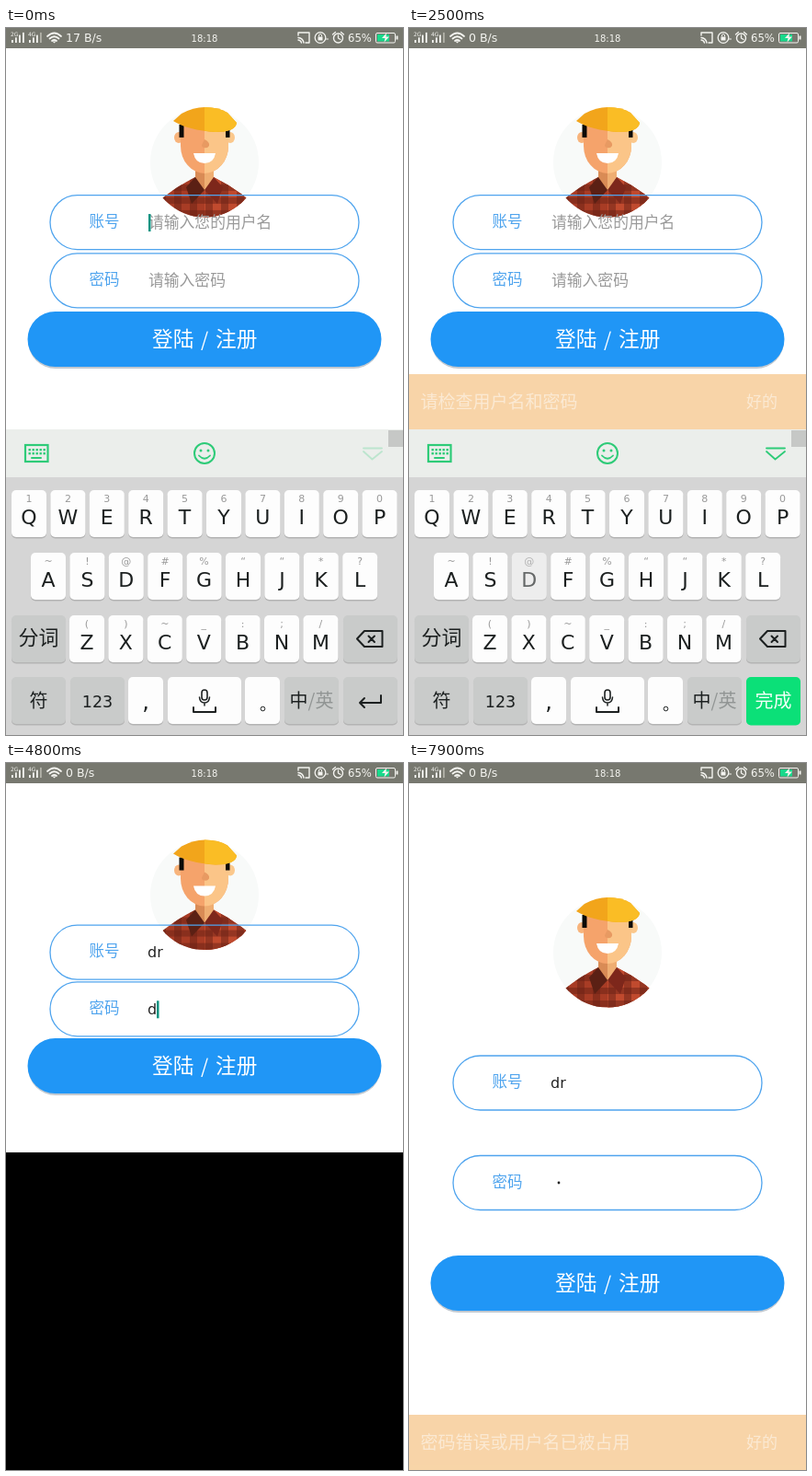
Recreate the animation shown at these times as an HTML page. Size 432 by 768 pixels, loop 8 s.

```html
<!DOCTYPE html>
<html lang="zh">
<head>
<meta charset="utf-8">
<style>
html, body { margin: 0; width: 100%; height: 100%; overflow: hidden; background: #fff; }
svg { display: block; width: 100vw; height: 100vh; }
text { font-family: "Noto Sans CJK SC", "Noto Sans CJK", sans-serif; font-weight: 200; }
.latin { font-family: "DejaVu Sans", sans-serif; font-weight: 400; }
.mid { text-anchor: middle; }
</style>
</head>
<body>
<svg id="stage" viewBox="0 0 432 768" xmlns="http://www.w3.org/2000/svg"></svg>
<script>
const LOOP = 8000, STEP = 100, FULL = 768, KEYS_TOP = 436, SECURE_TOP = 423;
const stage = document.getElementById('stage');
const $ = id => document.getElementById(id);

const rect = (x, y, w, h, fill, extra = '') =>
  `<rect x="${x}" y="${y}" width="${w}" height="${h}" fill="${fill}" ${extra}/>`;
const path = (d, fill, extra = '') => `<path d="${d}" fill="${fill}" ${extra}/>`;
const line = (d, color, width = 1.5) =>
  path(d, 'none', `stroke="${color}" stroke-width="${width}" stroke-linecap="round" stroke-linejoin="round"`);
const label = (s, x, y, size, fill, extra = '') =>
  `<text x="${x}" y="${y}" font-size="${size}" fill="${fill}" ${extra}>${s}</text>`;
const LATIN = 'class="latin"', MID = 'class="mid"', LATIN_MID = 'class="latin mid"';

function statusBar() {
  const white = '#f4f4f0';
  const signal = (x, tag, last) => label(tag, x, 9, 6, white, LATIN) +
    [0, 1, 2, 3].map(i => rect(x + 1 + i * 4, 13 - i * 2.7, 1.8, 3 + i * 2.7,
      i === 3 ? last : white)).join('');
  return rect(0, 0, 432, 22, '#77786f') +
    signal(5, '2G', white) + signal(24, '4G', '#b2b2a8') +
    line('M45 9Q52.500 2 60 9M47.500 11.500Q52.500 7 57.500 11.500M50 14Q52.500 12 55 14', white, 1.8) +
    path('M50.500 14.500h4l-2 2z', white) +
    label('', 65, 14.5, 12.5, white, LATIN + ' id="speed"') +
    label('18:18', 216, 14.5, 10, white, LATIN_MID) +
    line('M318 8V5H330V16H326M318 10.500Q323 11 324 16M318 13Q321 13.500 321.500 16', white, 1.4) +
    `<circle cx="342" cy="10.500" r="5.800" fill="none" stroke="${white}" stroke-width="1.300"/>` +
    rect(339.5, 9.5, 5, 4, white) + line('M340.500 9V7.500Q342 5.500 343.500 7.500V9M347.500 12h3', white, 1) +
    `<circle cx="361.500" cy="11" r="5" fill="none" stroke="${white}" stroke-width="1.400"/>` +
    line('M361.500 8V11L364 12.500M355.500 7L358.500 4.500M364.500 4.500L367.500 7', white, 1.3) +
    label('65%', 372, 14.5, 11.7, white, LATIN) +
    rect(402.5, 5.5, 21, 10.5, 'none', `rx="1.500" stroke="${white}"`) +
    rect(404, 7, 13, 7.5, '#18d98b') + rect(424.5, 8.5, 2, 4, white) +
    path('M414 5.500L409 11H412.500L411.500 15.500L417 9.500H413.500Z', white);
}

// Drawn around its own centre.
function avatar() {
  let plaid = '';
  for (let i = 0; i < 6; i++) plaid += rect(-50 + i * 17, 15, 8, 46, '#6d2217', 'opacity=".5"');
  for (let i = 0; i < 3; i++) plaid += rect(-60, 24 + i * 14, 120, 7, '#6d2217', 'opacity=".5"');
  const face = 'M-26 -46V-18A26 30 0 0 0 26 -18V-46Z';
  const hat = 'M-25 -53Q-12 -60 0 -60Q16 -60 25 -54L35 -43Q34 -33 12 -33Q-18 -35 -34 -45Z';
  const shirt = 'M-60 48L-46 39Q-30 26 -10 16L0 30L10 16Q30 26 46 39L60 48V62H-60Z';
  const halves = (d, left, right) => path(d, left) + path(d, right, 'clip-path="url(#right)"');
  return `<defs>
    <clipPath id="disc"><circle r="59.500"/></clipPath>
    <clipPath id="right"><rect x="0" y="-62" width="62" height="124"/></clipPath>
    <clipPath id="shirt">${path(shirt, '#000')}</clipPath></defs>
    <circle r="59" fill="#f8faf9"/>
    <g clip-path="url(#disc)">
      ${halves(shirt, '#a83c25', '#c04a2e')}
      <g clip-path="url(#shirt)">${plaid}</g>
      ${halves('M-10 4H10V18L0 31L-10 18Z', '#d98b55', '#efae72')}
      ${path('M-10 16L-20 27L-14 45L0 30Z', '#5b2014')}
      ${path('M10 16L20 27L14 45L0 30Z', '#7d271b')}
    </g>
    <ellipse cx="-28" cy="-27" rx="5" ry="6" fill="#f8b47c"/>
    <ellipse cx="28" cy="-27" rx="5" ry="6" fill="#fbc88c"/>
    ${halves(face, '#f5a36b', '#fbc588')}
    ${rect(-27.5, -41, 5, 14, '#0c0a08')}${rect(23, -37, 4.5, 10, '#0c0a08')}
    ${path('M0 -25Q6 -22 5 -18Q3 -15 0 -16Q-3 -16 -3 -19Z', '#e89a62')}
    ${path('M-12 -10H12Q10 1 0 1Q-10 1 -12 -10Z', '#fff')}
    ${halves(hat, '#f2a51b', '#fabd25')}`;
}

// Drawn around the field's vertical centre.
const field = (id, name) => `<g id="${id}">
  ${rect(48, -29.5, 336, 59, 'none', 'rx="29.500" stroke="#4fa4ee" stroke-width="1.300"')}
  ${label(name, 90.5, 4.5, 16.5, '#4fa4ee')}
  ${label('', 155, 6, 16.8, '#999', `id="${id}Hint"`)}
  ${label('', 154, 5.5, 16, '#222', `${LATIN} id="${id}Value"`)}
  ${rect(155, -9, 2.5, 19, '#089381', `id="${id}Cursor"`)}</g>`;

function key(x, y, w, fill, content, id = '', shadow = '#b4b4b4') {
  return `<g ${id && `id="${id}"`}>${rect(x, y + 1.5, w, 51, shadow, 'rx="5"')}` +
    `${rect(x, y, w, 51, fill, 'rx="5"')}${content}</g>`;
}

function keyboard() {
  const green = '#2ecb78', white = '#fdfdfd', grey = '#c9cbca', ink = '#1c2020', done = '#0be078';
  const row = (letters, hints, x0, y) => [...letters].map((c, i) => {
    const x = x0 + i * 42.4, mid = x + 19;
    return key(x, y, 38, white, label(hints[i], mid, y + 12.5, 11, '#999', LATIN_MID) +
      label(c, mid, y + 36.5, 22, ink, LATIN_MID), 'key' + c);
  }).join('');
  let dots = '';
  for (let i = 0; i < 10; i++) dots += rect(24.5 + i % 5 * 4, 457 + (i > 4) * 4, 2.4, 2.4, green);
  return rect(0, 436, 432, 52, '#ebeeeb') + rect(0, 488, 432, 280, '#d5d5d5') +
    rect(21, 453, 24.5, 18, 'none', `stroke="${green}" stroke-width="2.200"`) + dots +
    line('M28 467h10', green, 2) +
    `<circle cx="216" cy="462" r="11" fill="none" stroke="${green}" stroke-width="2"/>` +
    `<circle cx="212" cy="459" r="1.500" fill="${green}"/><circle cx="220" cy="459" r="1.500" fill="${green}"/>` +
    line('M210 464.500Q216 471 222 464.500', green, 1.8) +
    `<g id="hideIcon">${line('M389 456.500H409M389 460L398.500 468.500L409 460', green, 1.8)}</g>` +
    rect(416, 437, 16, 18, '#c6c8c6') +
    row('QWERTYUIOP', '1234567890', 6, 502) +
    row('ASDFGHJKL', '~!@#%““*?', 27, 570) +
    row('ZXCVBNM', '()~_:;/', 69, 638) +
    key(6, 638, 59, grey, label('分词', 35.5, 670, 22, ink, MID)) +
    key(367, 638, 59, grey, line('M382 663.500L390 655H409.500V672H390Z', ink, 2) +
      line('M394.500 660.500L401 667M401 660.500L394.500 667', ink, 2)) +
    key(6, 705, 59, grey, label('符', 35.5, 738, 20, ink, MID)) +
    key(70, 705, 59, grey, label('123', 99.5, 738, 17.5, ink, LATIN_MID)) +
    key(133, 705, 38, white, label(',', 152, 740, 24, ink, LATIN_MID)) +
    key(176, 705, 80, white, rect(213, 719, 6, 11, 'none', `rx="3" stroke="${ink}" stroke-width="1.600"`) +
      line('M210.500 727Q211 733 216 733Q221 733 221.500 727M216 733V736', ink) +
      line('M204 738V743H228V738', ink, 2)) +
    key(260, 705, 38, white, `<circle cx="279.500" cy="739.500" r="2.300" fill="none" stroke="${ink}"/>`) +
    key(303, 705, 59, grey, label('中<tspan fill="#919594">/英</tspan>', 332.5, 738, 20, ink, MID)) +
    key(367, 705, 59, grey, line('M408 725V733H385M390 728L385 733L390 738', ink, 2), 'enterKey') +
    key(367, 705, 59, done, label('完成', 396.5, 738, 20, '#f4fff8', MID), 'doneKey', done);
}

stage.innerHTML = rect(0, 0, 432, 768, '#fff') +
  `<g id="avatar">${avatar()}</g>${field('user', '账号')}${field('pass', '密码')}
  <g id="login">
    ${rect(24, -28, 384, 60, '#c3c9d0', 'rx="30"')}${rect(23.5, -30, 385, 60, '#2096f6', 'rx="30"')}
    ${label('登陆', 159, 8, 22.7, '#fff')}${label('/', 216, 8, 21, '#fff', MID)}${label('注册', 228, 8, 22.7, '#fff')}
  </g>
  <g id="snack">${rect(0, -60, 432, 60, '#f2ab53')}
    <g id="snackLabels">${label('', 12.5, -23.5, 19, '#fff', 'id="snackText"')}${label('好的', 367, -24, 17, '#fff')}</g></g>
  <g id="keyboard">${keyboard()}</g>
  ${rect(0, SECURE_TOP, 432, FULL - SECURE_TOP, '#000', 'id="secure"')}` + statusBar();

$('userHint').textContent = '请输入您的用户名';
$('passHint').textContent = '请输入密码';
$('passValue').insertAdjacentHTML('afterend', '<circle id="mask" cx="163" cy="0" r="1.400" fill="#222"/>');

const show = (id, on) => $(id).setAttribute('display', on ? 'inline' : 'none');
const move = (id, x, y) => $(id).setAttribute('transform', `translate(${x} ${y})`);
const text = (id, s) => { if ($(id).textContent !== s) $(id).textContent = s; };
const ramp = (t, from, to) => Math.min(1, Math.max(0, (t - from) / (to - from)));
const easeOut = p => 1 - (1 - p) ** 3;
const within = (t, from, to) => t >= from && t < to;
const blink = (t, start) => (t - start + 2000) % 1000 < 500;

const T = { hide: 100, firstSnack: 850, open: 2000, opened: 2200, d: 2600, r: 2900,
  secure: 3600, pass: 4400, close: 5200, masked: 5900, secondSnack: 6250 };

// A closing keyboard uncovers the already enlarged form.
const slideOut = (t, start) => ramp(t, start, start + 250) ** 1.3;

function drawForm(t, height) {
  const squeeze = FULL - height;
  move('avatar', 216, 206 - squeeze * .181);
  move('user', 0, 347.5 - squeeze * .411);
  move('pass', 0, 456 - squeeze * .547);
  move('login', 0, 565 - squeeze * .684);

  const user = t < T.d ? '' : t < T.r ? 'd' : 'dr';
  const typed = t >= T.pass, masked = t >= T.masked;
  show('userHint', !user);
  text('userValue', user);
  show('passHint', !typed);
  text('passValue', typed && !masked ? 'd' : '');
  show('mask', masked);

  const userStart = t < T.d ? 800 : t < T.r ? T.d : T.r;
  show('userCursor', t < T.secure && blink(t, userStart));
  $('userCursor').setAttribute('x', 155 + [0, 9, 17][user.length]);
  show('passCursor', t >= T.secure && blink(t, typed ? T.pass : T.secure));
  $('passCursor').setAttribute('x', masked ? 171 : typed ? 164 : 155);
}

function drawSnack(t, height) {
  const second = t >= T.secondSnack;
  const start = second ? T.secondSnack : T.firstSnack;
  const enter = easeOut(ramp(t, start, start + 150));
  const stay = 1 - ramp(t, start + 1550, start + 1750);
  const scale = .8 + .2 * enter;
  text('snackText', second ? '密码错误或用户名已被占用' : '请检查用户名和密码');
  $('snack').setAttribute('opacity', enter * stay);
  $('snackLabels').setAttribute('opacity', stay);
  $('snack').setAttribute('transform',
    `translate(216 ${height - 30}) scale(${scale}) translate(-216 30)`);
}

function drawKeys(t) {
  const drop = t < T.open ? slideOut(t, T.hide) : 1 - easeOut(ramp(t, T.open, T.opened));
  show('keyboard', t < T.secure && drop < 1);
  move('keyboard', 0, drop * (FULL - KEYS_TOP));
  show('secure', within(t, T.secure, T.close + 250));
  move('secure', 0, slideOut(t, T.close) * (FULL - SECURE_TOP));
  show('enterKey', t < 1000);
  show('doneKey', t >= 1000);
  $('hideIcon').setAttribute('opacity', t < 1000 ? .25 : 1);
  $('keyD').setAttribute('opacity', within(t, 2450, T.d) ? .6 : 1);
  $('keyR').setAttribute('opacity', within(t, 2750, T.r) ? .6 : 1);
}

function draw(t) {
  const height = t < T.hide || within(t, T.opened, T.secure) ? KEYS_TOP
    : within(t, T.secure, T.close) ? SECURE_TOP : FULL;
  text('speed', t < 500 ? '17 B/s' : '0 B/s');
  drawForm(t, height);
  drawSnack(t, height);
  drawKeys(t);
}

const began = performance.now();
function tick() {
  const t = (performance.now() - began) % LOOP;
  draw(Math.floor(t / STEP) * STEP);
  requestAnimationFrame(tick);
}
tick();
</script>
</body>
</html>
```
